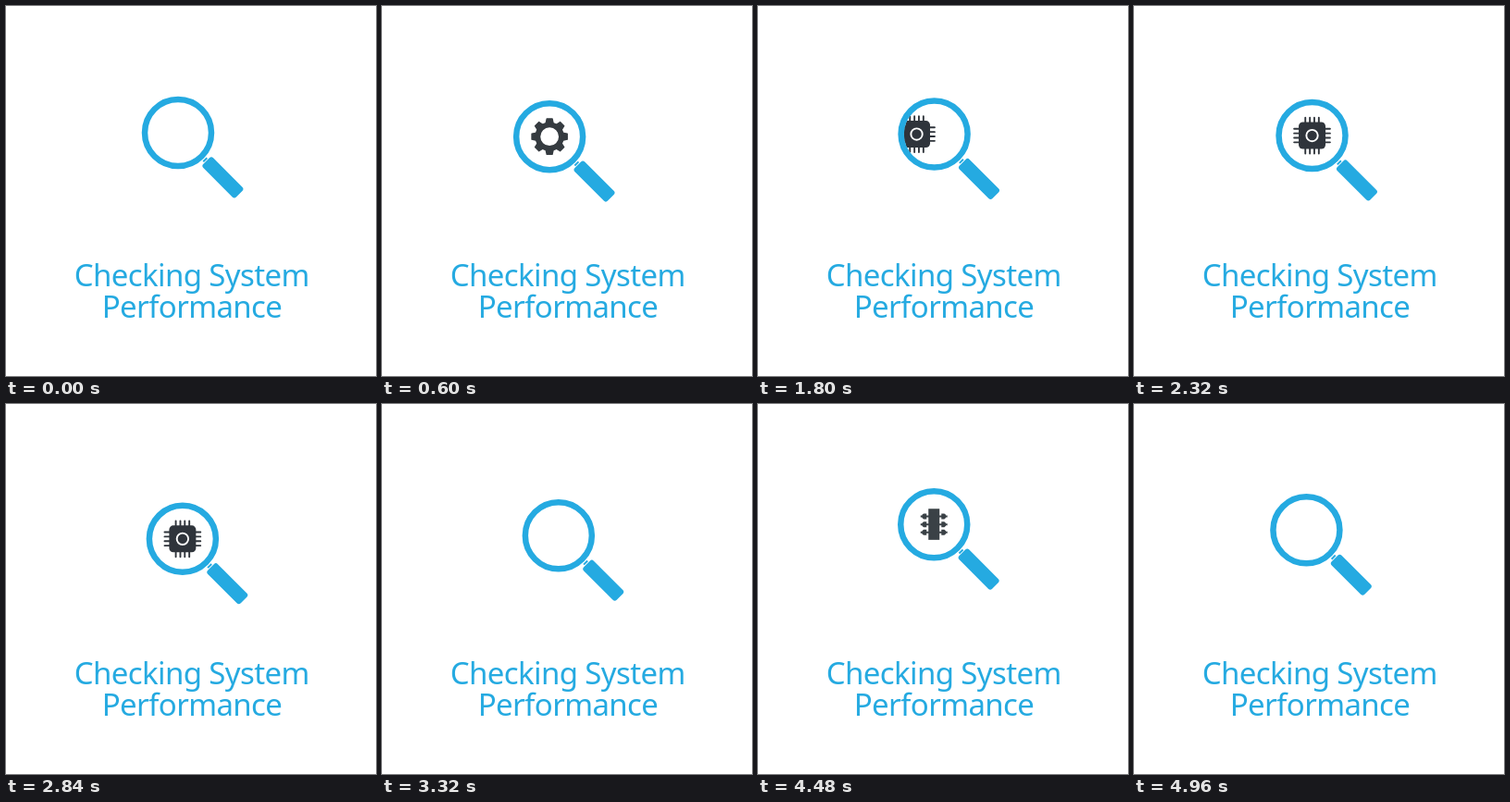
Write an HTML page that moves like this. It is 400 by 400 pixels and loops after 5 s.

```html
<!DOCTYPE html>
<html lang="en">
<head>
<meta charset="utf-8">
<title>Checking System Performance</title>
<style>
  html, body { margin: 0; width: 100%; height: 100%; overflow: hidden; background: #fff; }
  svg { display: block; width: 100%; height: 100%; }
  text { font: 400 33px "Noto Sans", sans-serif; letter-spacing: -0.61px; text-anchor: middle; }
</style>
</head>
<body>
<svg viewBox="0 0 400 400">
  <defs>
    <clipPath id="glass"><circle r="33"/></clipPath>
    <path id="tooth" d="M-5 -13 L-3.6 -19.3 Q-3.5 -19.8 -3 -19.8 H3 Q3.5 -19.8 3.6 -19.3 L5 -13Z"/>
    <path id="pins" d="M-7.3 -13V-19.4M-2.4 -13V-19.4M2.4 -13V-19.4M7.3 -13V-19.4"/>
    <path id="leg" d="M5 -1H14.5V1H5ZM8 -3H11.2L12.8 -1.6V1.6L11.2 3H8Z"/>
  </defs>
  <g id="lens">
    <g clip-path="url(#glass)">
      <g id="gear" fill="#353b40">
        <circle r="12.8" fill="none" stroke="#353b40" stroke-width="5.8"/>
      </g>
      <g id="chip" fill="#2f343b">
        <rect x="-14.5" y="-14.5" width="29" height="29" rx="4.5"/>
        <g id="rows" fill="none" stroke="#2f343b" stroke-width="1.9" stroke-linecap="round"/>
        <circle r="6.2" fill="none" stroke="#fff" stroke-width="1.9"/>
      </g>
      <g id="board" fill="#3a4146">
        <rect x="-6" y="-17" width="12" height="33.6"/>
      </g>
    </g>
    <circle r="36" fill="none" stroke="#25aae1" stroke-width="6.5"/>
    <g transform="rotate(45)" fill="#25aae1">
      <rect x="40.4" y="-2.9" width="2" height="5.8"/>
      <rect x="43.3" y="-7.6" width="50.3" height="15.2" rx="3"/>
    </g>
  </g>
  <g fill="#25aae1">
    <text x="200.8" y="302.8">Checking System</text>
    <text x="201" y="336.8">Performance</text>
  </g>
</svg>
<script>
const LOOP = 5000, STEP = 40;
const el = id => document.getElementById(id);

function addUse(parent, ref, transform) {
  const use = document.createElementNS("http://www.w3.org/2000/svg", "use");
  use.setAttribute("href", "#" + ref);
  use.setAttribute("transform", transform);
  el(parent).appendChild(use);
}
for (let i = 0; i < 8; i++) addUse("gear", "tooth", `rotate(${i * 45})`);
for (let i = 0; i < 4; i++) addUse("rows", "pins", `rotate(${i * 90})`);
for (const y of [-8.8, 0, 8.6])
  for (const side of [-1, 1]) addUse("board", "leg", `translate(0 ${y}) scale(${side} 1)`);

// Lens legs: start, duration, from, to, sideways bow
const legs = [
  { at: 0, dur: 1000, from: [186, 137], to: [178.5, 143.4], bow: 0 },
  { at: 1000, dur: 1000, from: [178.5, 143.4], to: [192, 138], bow: 0 },
  { at: 2000, dur: 1000, from: [192, 138], to: [190.5, 146.4], bow: 1.3 },
  { at: 3020, dur: 1000, from: [190.5, 146.4], to: [192.1, 127.3], bow: 0 },
  { at: 4110, dur: 1010, from: [192.1, 127.3], to: [186, 137], bow: 0 }
];
// Each icon enters from the left and leaves to the right
const icons = [
  { node: el("gear"), enter: 80, leave: 1220 },
  { node: el("chip"), enter: 1650, leave: 2900 },
  { node: el("board"), enter: 3360, leave: 4560 }
];
const TRAVEL = 56, ENTER = 360, LEAVE = 340;

const clamp = u => Math.min(1, Math.max(0, u));
const smooth = u => u * u * (3 - 2 * u);

function lensAt(t) {
  let leg = legs[0];
  for (const l of legs) if (t >= l.at) leg = l;
  const e = smooth(clamp((t - leg.at) / leg.dur));
  const mix = k => leg.from[k] + (leg.to[k] - leg.from[k]) * e;
  return [mix(0) + leg.bow * Math.sin(Math.PI * e), mix(1)];
}

function slideAt(t, icon) {
  const a = 1 - clamp((t - icon.enter) / ENTER);
  const b = clamp((t - icon.leave) / LEAVE);
  return TRAVEL * (b * b - a * a);
}

function draw(t) {
  const [x, y] = lensAt(t);
  el("lens").setAttribute("transform", `translate(${x.toFixed(2)} ${y.toFixed(2)})`);
  for (const icon of icons)
    icon.node.setAttribute("transform", `translate(${slideAt(t, icon).toFixed(2)} 0)`);
}

const start = performance.now();
function tick() {
  const t = (performance.now() - start) % LOOP;
  draw(Math.floor(t / STEP) * STEP);
  requestAnimationFrame(tick);
}
draw(0);
requestAnimationFrame(tick);
</script>
</body>
</html>
```
